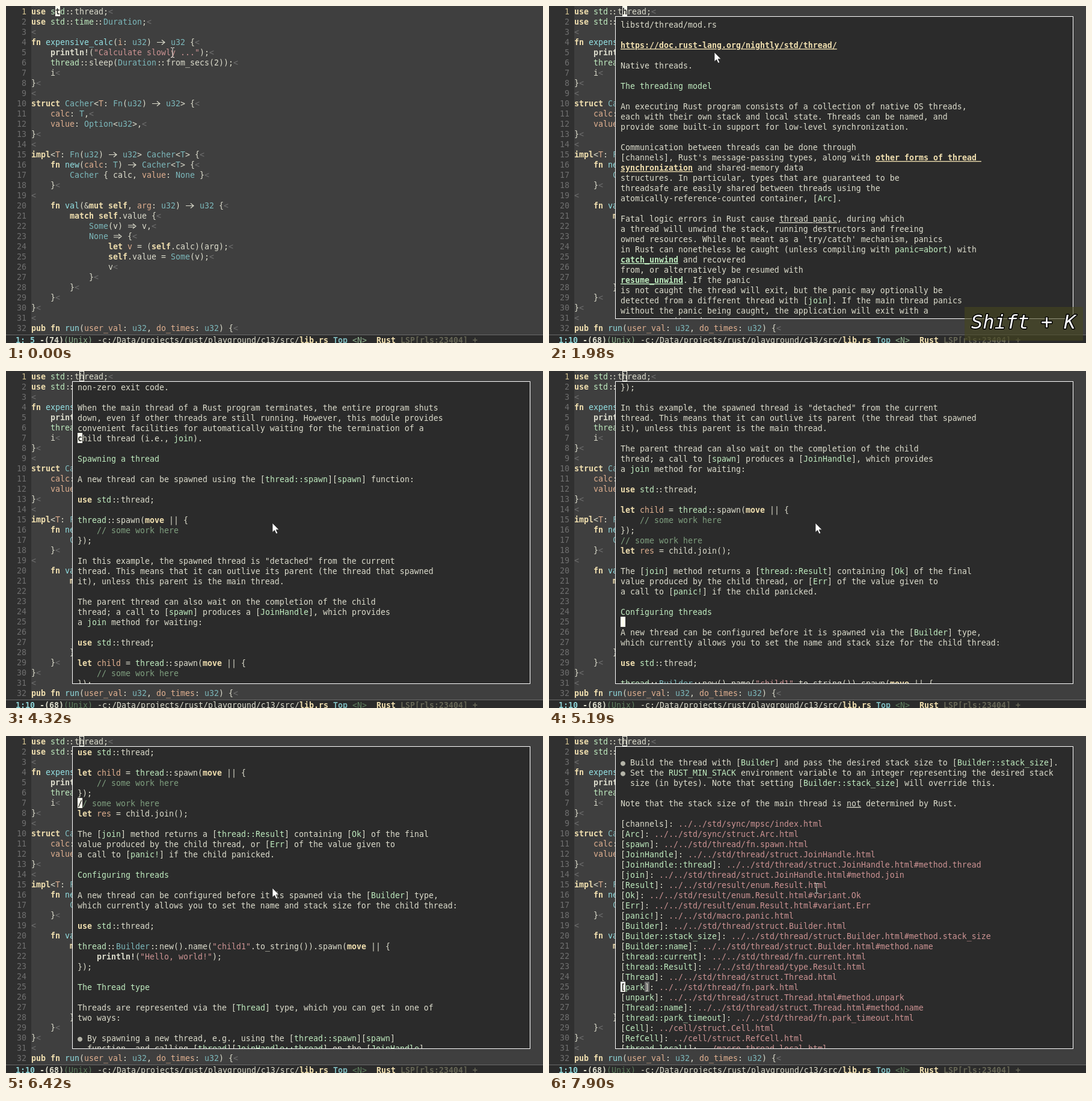
An HTML page that plays this animation: 893x561 px, repeating every 8 s.

```html
<!DOCTYPE html>
<html lang="en">
<head>
<meta charset="utf-8">
<title>Editor documentation popup</title>
<style>
html, body { margin: 0; width: 100%; height: 100%; overflow: hidden; background: #3f3f3f; }
svg { display: block; }
text { font: 13.29px "DejaVu Sans Mono", monospace; fill: #dcdccc; white-space: pre; }
.k { fill: #f0dfaf; font-weight: bold; }
.b { font-weight: bold; }
.s { fill: #cc9393; }
.c { fill: #7f9f7f; }
.t { fill: #7cb8bb; }
.f { fill: #93e0e3; }
.v { fill: #dfaf8f; }
.n, .q { fill: #bfebbf; }
.o { fill: #b4b4a8; }
.l, .g, .u { text-decoration: underline 1px; text-underline-offset: 1.5px; text-decoration-skip-ink: none; }
.l { fill: #f0dfaf; font-weight: bold; }
.g { fill: #bfebbf; font-weight: bold; }
.eol, .num { fill: #6f6f6f; }
.now { fill: #d0bf8f; }
.pos { fill: #8cd0d3; font-weight: bold; }
.top { fill: #7cb8bb; font-weight: bold; }
.soft { fill: #8fb28f; }
.idle .soft { fill: #5f7f5f; }
.lsp { fill: #656555; font-weight: bold; }
.dark { fill: #2b2b2b; font-weight: bold; }
.arrow { fill: none; stroke: #dcdccc; stroke-width: 1.2; }
.key { font: italic 32.1px "DejaVu Sans Mono", monospace; fill: #fff; stroke: #000; stroke-width: 3px; paint-order: stroke; stroke-linejoin: round; }
</style>
</head>
<body>
<svg id="stage" width="893" height="561" viewBox="0 0 893 561" xml:space="preserve"></svg>
<script>
const CODE = `use std::thread;
use std::time::Duration;

fn expensive_calc(i: u32) -> u32 {
    println!("Calculate slowly ...");
    thread::sleep(Duration::from_secs(2));
    i
}

struct Cacher<T: Fn(u32) -> u32> {
    calc: T,
    value: Option<u32>,
}

impl<T: Fn(u32) -> u32> Cacher<T> {
    fn new(calc: T) -> Cacher<T> {
        Cacher { calc, value: None }
    }

    fn val(&mut self, arg: u32) -> u32 {
        match self.value {
            Some(v) => v,
            None => {
                let v = (self.calc)(arg);
                self.value = Some(v);
                v
            }
        }
    }
}

pub fn run(user_val: u32, do_times: u32) {`.split('\n');

// "#" heading, "|" code; *link*  %code link%  ~emphasis~  $code$
const DOC = `libstd/thread/mod.rs

*https://doc.rust-lang.org/nightly/std/thread/*

Native threads.

#The threading model

An executing Rust program consists of a collection of native OS threads,
each with their own stack and local state. Threads can be named, and
provide some built-in support for low-level synchronization.

Communication between threads can be done through
[channels], Rust's message-passing types, along with *other forms of thread *
*synchronization* and shared-memory data
structures. In particular, types that are guaranteed to be
threadsafe are easily shared between threads using the
atomically-reference-counted container, [Arc].

Fatal logic errors in Rust cause ~thread panic~, during which
a thread will unwind the stack, running destructors and freeing
owned resources. While not meant as a 'try/catch' mechanism, panics
in Rust can nonetheless be caught (unless compiling with $panic=abort$) with
%catch_unwind% and recovered
from, or alternatively be resumed with
%resume_unwind%. If the panic
is not caught the thread will exit, but the panic may optionally be
detected from a different thread with [join]. If the main thread panics
without the panic being caught, the application will exit with a
non-zero exit code.

When the main thread of a Rust program terminates, the entire program shuts
down, even if other threads are still running. However, this module provides
convenient facilities for automatically waiting for the termination of a
child thread (i.e., $join$).

#Spawning a thread

A new thread can be spawned using the [thread::spawn][spawn] function:

|use std::thread;

|thread::spawn(move || {
|    // some work here
|});

In this example, the spawned thread is "detached" from the current
thread. This means that it can outlive its parent (the thread that spawned
it), unless this parent is the main thread.

The parent thread can also wait on the completion of the child
thread; a call to [spawn] produces a [JoinHandle], which provides
a $join$ method for waiting:

|use std::thread;

|let child = thread::spawn(move || {
|    // some work here
|});
|// some work here
|let res = child.join();

The [join] method returns a [thread::Result] containing [Ok] of the final
value produced by the child thread, or [Err] of the value given to
a call to [panic!] if the child panicked.

#Configuring threads

A new thread can be configured before it is spawned via the [Builder] type,
which currently allows you to set the name and stack size for the child thread:

|use std::thread;

|thread::Builder::new().name("child1".to_string()).spawn(move || {
|    println!("Hello, world!");
|});

#The Thread type

Threads are represented via the [Thread] type, which you can get in one of
two ways:

● By spawning a new thread, e.g., using the [thread::spawn][spawn]
  function, and calling [thread][JoinHandle::thread] on the [JoinHandle].
● By requesting the current thread, using the [thread::current] function.

The [thread::current] function is available even for threads not spawned
by the APIs of this module.

#Thread-local storage

This module also provides an implementation of thread-local storage for Rust
programs. Thread-local storage is a method of storing data into a global
variable that each thread in the program will have its own copy of.
Threads do not share this data, so accesses do not need to be synchronized.

A thread-local key owns the value it contains and will destroy the value when the
thread exits. It is created with the [thread_local!] macro and can contain any
value that is $'static$ (no borrowed pointers). It provides an accessor function,
[with], that yields a shared reference to the value to the specified
closure. Thread-local keys allow only shared access to values, as there would be no
way to guarantee uniqueness if mutable borrows were allowed. Most values
will want to make use of some form of interior mutability through the
[Cell] or [RefCell] types.

#Naming threads

Threads are able to have associated names for identification purposes. By default, spawned
threads are unnamed. To specify a name for a thread, build the thread with [Builder] and pass
the desired thread name to [Builder::name]. To retrieve the thread name from within the
thread, use [Thread::name]. A couple examples of where the name of a thread gets used:

● If a panic occurs in a named thread, the thread name will be printed in the panic message.
● The thread name is provided to the OS where applicable (e.g., $pthread_setname_np$ in
  unix-like platforms).

#Stack size

The default stack size for spawned threads is 2 MiB, though this particular stack size is
subject to change in the future. There are two ways to manually specify the stack size for
spawned threads:

● Build the thread with [Builder] and pass the desired stack size to [Builder::stack_size].
● Set the $RUST_MIN_STACK$ environment variable to an integer representing the desired stack
  size (in bytes). Note that setting [Builder::stack_size] will override this.

Note that the stack size of the main thread is ~not~ determined by Rust.

[channels]: ../../std/sync/mpsc/index.html
[Arc]: ../../std/sync/struct.Arc.html
[spawn]: ../../std/thread/fn.spawn.html
[JoinHandle]: ../../std/thread/struct.JoinHandle.html
[JoinHandle::thread]: ../../std/thread/struct.JoinHandle.html#method.thread
[join]: ../../std/thread/struct.JoinHandle.html#method.join
[Result]: ../../std/result/enum.Result.html
[Ok]: ../../std/result/enum.Result.html#variant.Ok
[Err]: ../../std/result/enum.Result.html#variant.Err
[panic!]: ../../std/macro.panic.html
[Builder]: ../../std/thread/struct.Builder.html
[Builder::stack_size]: ../../std/thread/struct.Builder.html#method.stack_size
[Builder::name]: ../../std/thread/struct.Builder.html#method.name
[thread::current]: ../../std/thread/fn.current.html
[thread::Result]: ../../std/thread/type.Result.html
[Thread]: ../../std/thread/struct.Thread.html
[park]: ../../std/thread/fn.park.html
[unpark]: ../../std/thread/struct.Thread.html#method.unpark
[Thread::name]: ../../std/thread/struct.Thread.html#method.name
[thread::park_timeout]: ../../std/thread/fn.park_timeout.html
[Cell]: ../cell/struct.Cell.html
[RefCell]: ../cell/struct.RefCell.html
[thread_local!]: ../macro.thread_local.html
[with]: struct.LocalKey.html#method.with`.split('\n');

const RUST = /(?<s>"[^"]*")|(?<c>\/\/.*)|(?<arrow>->|=>)|(?<dots>::)|(?<k>\b(?:use|fn|struct|impl|mut|self|match|let|pub|move)\b)|(?<b>println!)|(?<f>(?<=fn )\w+)|(?<v>(?<=let )\w+|\w+(?=: ))|(?<t>\b[A-Z]\w*|\bu32)|(?<n>\w+(?=::))/g;
const PROSE = /(?<o>●)|(?<s>(?<=\]: ).*)|(?<=\[)(?<n>(?!channels)[^\]]+)(?=\])|\*(?<l>[^*]+)\*|%(?<g>[^%]+)%|~(?<u>[^~]+)~|\$(?<q>[^$]+)\$/g;

const CW = 8, LH = 17, LOOP = 8000;
const esc = s => s.replace(/&/g, '&amp;').replace(/</g, '&lt;');

function run(s, x, y, cls = '') {
  const body = s.trimStart();
  if (!body) return '';
  x += (s.length - body.length) * CW;
  if (cls === 'dots') return `<text x="${x + 1} ${x + 7}" y="${y}">::</text>`;
  if (cls === 'arrow') {
    const d = s === '->'
      ? `M${x + 1} ${y - 4.5}h13m-5-4l5 4-5 4`
      : `M${x + 1} ${y - 6}h11m-11 3h11M${x + 9} ${y - 8.5}l5 4-5 4`;
    return `<path class="arrow" d="${d}"/>`;
  }
  return `<text class="${cls}" x="${x}" y="${y}">${esc(body)}</text>`;
}

// Returns the markup of one line and its visible text.
function paint(line, rule, x, y) {
  let svg = '', shown = '', at = 0;
  const put = (s, cls) => { svg += run(s, x + shown.length * CW, y, cls); shown += s; };
  for (const m of line.matchAll(rule)) {
    const [cls, s] = Object.entries(m.groups).find(e => e[1] !== undefined);
    put(line.slice(at, m.index));
    put(s, cls);
    at = m.index + m[0].length;
  }
  put(line.slice(at));
  return { svg, shown };
}

const code = CODE.map((line, i) => {
  const y = 14 + i * LH, no = String(i + 1);
  return run(no, 34 - no.length * CW, y, i ? 'num' : 'now')
    + paint(line, RUST, 42, y).svg
    + run('<', 42 + line.length * CW, y, 'eol');
}).join('');

const doc = DOC.map((line, i) => {
  const y = i * LH;
  if (line[0] === '#') return { svg: run(line.slice(1), 119, y, 'n'), shown: line.slice(1) };
  return line[0] === '|' ? paint(line.slice(1), RUST, 119, y) : paint(line, PROSE, 119, y);
});

const status = [
  ['-(', 56, 'b'], [')', 88, 'b'], ['(Unix)', 96, 'soft'], ['-', 152, ''],
  ['c:/Data/projects/rust/playground/c13/src/', 160, ''], ['lib.rs', 488, 'k'],
  ['Top', 544, 'top'], ['<N>', 576, 'soft'], ['Rust', 616, 'k'],
  ['LSP[rls:23404]', 656, 'lsp'], ['+', 776, 'lsp']
].map(([s, x, cls]) => run(s, x, 561, cls)).join('');

document.getElementById('stage').innerHTML = `
<clipPath id="inner"><rect x="111" y="18" width="760" height="502"/></clipPath>
<rect width="893" height="561" fill="#3f3f3f"/>
<rect width="42" height="547" fill="#303030"/>
${code}
<rect id="cur" y="0" width="8" height="17"/><text id="curCh" class="dark" y="14"></text>
<rect y="547" width="893" height="14" fill="#2b2b2b"/>
<rect y="547" width="893" height="1" fill="#6a6a6a"/>
<g id="status">${status}<text id="pos" class="pos" x="16" y="561"></text><text id="left" class="b" x="72" y="561"></text></g>
<g id="popup">
  <rect x="110.5" y="17.5" width="761" height="503" fill="#2b2b2b" stroke="#fff"/>
  <g clip-path="url(#inner)">
    <rect id="pair" width="8" height="17" fill="#6f6f6f"/>
    <g id="doc">${doc.map(d => d.svg).join('')}</g>
    <g id="point"><rect y="-14" width="8" height="17" fill="#ffffef"/><text id="pointCh" class="dark"></text></g>
  </g>
</g>
<g id="keys"><rect id="keyBox" y="501" height="56" fill="#46461e" opacity=".6"/><text id="keyText" class="key" y="537"></text></g>
<path id="arrow" d="M0 0V15.5L3.6 12.2 6.2 18 8.8 16.9 6.2 11.2H11Z" fill="#fff" stroke="#222" stroke-width=".8"/>
<path id="beam" d="M-1-8H1.5M2.5-8H5M2-7.5V7.5M-1 8H1.5M2.5 8H5" fill="none" stroke="#e8e8e0"/>`;

const el = {};
document.querySelectorAll('#stage [id]').forEach(e => { el[e.id] = e; });
const show = (e, on) => e.setAttribute('visibility', on ? 'visible' : 'hidden');
const move = (e, x, y) => e.setAttribute('transform', `translate(${x} ${y})`);
const set = (e, attrs) => { for (const k in attrs) e.setAttribute(k, attrs[k]); };

// Wheel turns: time and the first visible line; the point is kept five lines from either edge.
const scrolls = [];
{
  let row = 10, col = 34;
  for (const [at, top] of [
    [0, -1], [4000, 4], [4090, 14], [4230, 29], [4550, 44], [4640, 74],
    [5020, 69], [5105, 59], [5190, 44], [5340, 24], [5720, 29], [5805, 34], [5890, 44],
    [6350, 49], [6420, 54], [6830, 84], [7140, 89], [7215, 114], [7290, 151],
    [7760, 146], [7830, 136], [7900, 121]
  ]) {
    const next = Math.min(DOC.length - 1, top + 23, Math.max(row, top + 5));
    if (next !== row) col = 0;
    row = next;
    scrolls.push({ at, top, row, col });
  }
}

const hops = [510, 660, 810, 1030, 1200];
const stepped = (t, a, b, n) =>
  Math.max(0, Math.min(n, Math.floor((t - a) / (b - a) * (n - 1)) + 1)) / n;

function draw(t) {
  const col = 5 + hops.filter(h => t >= h).length;
  const away = t >= 3470;
  const x = 42 + col * CW;
  set(el.cur, away
    ? { x: x + .5, y: .5, width: 7, height: 16, fill: 'none', stroke: '#ffffef' }
    : { x, y: 0, width: 8, height: 17, fill: '#ffffef', stroke: 'none' });
  el.curCh.setAttribute('x', x);
  el.curCh.textContent = away ? '' : CODE[0][col];
  el.pos.textContent = '1:' + String(col).padStart(2);
  el.left.textContent = t < 1200 ? '74' : '68';
  el.status.setAttribute('class', away ? 'idle' : '');

  const { top, row, col: c } = scrolls.filter(s => t >= s.at).pop();
  const base = top < 0 ? 36 : 32 - top * LH;
  const y = base + row * LH;
  const text = doc[row].shown;
  show(el.popup, t >= 1980);
  move(el.doc, 0, base);
  show(el.point, away);
  move(el.point, 119 + c * CW, y);
  el.pointCh.textContent = text[c] || '';
  show(el.pair, away && text[c] === '[');
  move(el.pair, 119 + text.indexOf(']') * CW, y - 14);

  const key = t >= 510 && t < 1430 ? 'L' : t >= 1670 && t < 2600 ? 'Shift + K' : '';
  const w = key.length * 19.33;
  show(el.keys, key);
  set(el.keyBox, { x: 888 - w - 23, width: w + 23 });
  el.keyText.setAttribute('x', 876 - w);
  el.keyText.textContent = key;

  const p = stepped(t, 2910, 3300, 6), q = stepped(t, 3770, 3940, 3);
  const mx = 275 + 119 * p + 49 * q, my = 77 + 107 * p + 69 * q;
  const beam = t < 1980 || (t >= 3770 && t < 4230) || t >= 7760;
  show(el.beam, beam);
  show(el.arrow, !beam);
  move(el.beam, mx, my + .5);
  move(el.arrow, mx, my);
}

function tick() {
  draw(performance.now() % LOOP);
  requestAnimationFrame(tick);
}
tick();
</script>
</body>
</html>
```
